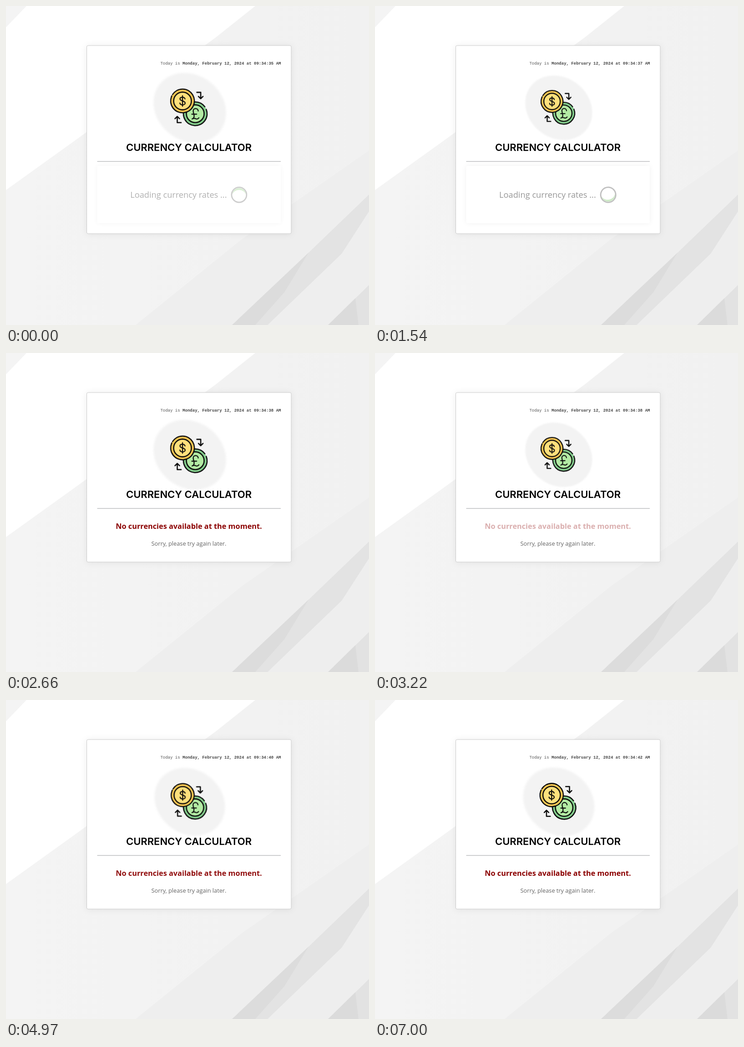
Animation of 798 by 702 pixels, one loop 7.07 s. Source, as an HTML page:

```html
<!DOCTYPE html>
<html lang="en">
<head>
<meta charset="utf-8">
<title>Currency calculator</title>
<style>
  html, body { margin: 0; width: 100%; height: 100%; overflow: hidden; background: #f2f2f2; }
  svg { display: block; width: 798px; height: 702px; }
  text { font-family: "Open Sans", sans-serif; }
  .clock { font: 9.03px "Liberation Mono", "Courier New", monospace; fill: #555; text-anchor: end; }
  .clock tspan { font-weight: 700; fill: #444; }
  .title { font: 600 22px Inter, sans-serif; text-anchor: middle; }
  .heading { font-size: 16.3px; font-weight: 700; fill: #8b0000; text-anchor: middle; }
  .sorry { font-size: 12.75px; fill: #636363; text-anchor: middle; }
  .loading { font-size: 18.4px; fill: #444; }
  #card { fill: #fff; stroke: #cbcbcb; filter: drop-shadow(0 1px 7px rgba(0, 0, 0, .07)); }
  #panel { fill: #fff; filter: drop-shadow(0 0 6px rgba(0, 0, 0, .11)); }
  #icon { transform-origin: 402px 223px; }
  #content { transform-origin: 402px 415px; }
  #spinner { transform-origin: 513.5px 415.5px; }
  .halo { fill: #f3f3f3; filter: blur(2px); }
  .ink { fill: none; stroke: #0b0b0b; stroke-width: 2.6; stroke-linecap: round; stroke-linejoin: round; }
  .ink .sign { stroke-width: 2.3; }
</style>
</head>
<body>
<svg viewBox="0 0 798 702">
  <defs>
    <linearGradient id="paper" x1="0" y1="0" x2="1" y2="0">
      <stop offset="0" stop-color="#f4f4f4"/>
      <stop offset="1" stop-color="#f1f1f1"/>
    </linearGradient>
  </defs>

  <g id="backdrop">
    <rect width="798" height="702" fill="url(#paper)"/>
    <path fill="#fff" d="M45 0H548L460 70L160 290L0 405V47Z"/>
    <path fill="#eee" d="M798 318L520 512L285 702H798Z"/>
    <path fill="#e3e3e3" d="M798 415L665 543L497 702H575L738 545L798 452Z"/>
    <path fill="#dcdcdc" d="M665 543L497 702H548L612 630Z"/>
    <path fill="#e2e2e2" d="M798 614L708 702H798Z"/>
    <path fill="#dbdbdb" d="M768 643L708 702H775Z"/>
  </g>

  <rect id="card" x="177.5" y="87" width="449.5" rx="3"/>
  <text class="clock" x="604.5" y="129">Today is <tspan id="time"></tspan></text>

  <g id="icon">
    <ellipse class="halo" cx="404" cy="224" rx="84" ry="72" transform="rotate(38 404 224)"/>
    <circle cx="416" cy="237" r="26" fill="#86d08f"/>
    <circle cx="416" cy="237" r="19.5" fill="#b3eba4"/>
    <g class="ink">
      <path d="M440.2 227.5A26 26 0 1 1 437 221.7"/>
      <circle cx="416" cy="237" r="19.5"/>
      <path class="sign" d="M422.5 231C422 224 411.500 224 411.500 231C411.500 236 415 241 413 245Q412 248 409 248.500Q414 246 417 248Q421 250 424 246M408.500 238H419"/>
    </g>
    <circle cx="388" cy="209" r="26" fill="#fcc954"/>
    <circle cx="388" cy="209" r="19.500" fill="#ffe07c"/>
    <g class="ink">
      <path d="M366.200 194.800A26 26 0 1 1 363.800 199.500A26 26 0 0 1 364.500 197.800M369.700 190.500L370.500 189.800"/>
      <circle cx="388" cy="209" r="19.500"/>
      <path class="sign" d="M388 197.500V220.500M393.500 204.500C392.500 199.500 382.500 199.500 382.500 204.500C382.500 210 393.800 208 393.800 213.500C393.800 218.800 383 219 382.200 213.500"/>
      <path d="M419.500 190H428V203M423 199L428 204L433 199M385 256.500H376.500V243.500M371.500 248L376.500 243L381.500 248"/>
    </g>
  </g>

  <text class="title" x="402" y="318.500">CURRENCY CALCULATOR</text>

  <g id="loader">
    <rect id="panel" x="200.500" y="352" width="403.500" height="126" rx="3"/>
    <g id="content">
      <text class="loading" x="272" y="422">Loading currency rates ...</text>
      <g id="spinner">
        <path fill="#a4d896" d="M498.500 415.500A15 15 0 0 1 528.500 415.500A15.200 13 0 0 0 498.500 415.500Z"/>
        <circle cx="513.500" cy="415.500" r="16.700" fill="none" stroke="#808080" stroke-width="2.600"/>
      </g>
    </g>
  </g>

  <g id="failure">
    <text class="heading" id="heading" x="402" y="386.500">No currencies available at the moment.</text>
    <text class="sorry" x="402" y="423.500">Sorry, please try again later.</text>
  </g>

  <path d="M200.500 342.200H604" stroke="#c6c7c9" stroke-width="1.800"/>
</svg>

<script>
  const LOOP = 7070, STEP = 70, RATE = 1.05;
  const FAIL_AT = 1750, FIRST_TICK = 210, TICK = 1050;
  const $ = id => document.getElementById(id);

  // A paused animation whose position is set from the clock; lead shifts its phase.
  function track(id, keyframes, duration, lead, easing = 'linear') {
    const frames = keyframes.map(frame => ({ ...frame, easing }));
    const animation = $(id).animate(frames, { duration, iterations: Infinity });
    animation.pause();
    return { animation, lead };
  }

  const there = (a, b) => [a, b, a];
  const scale = s => ({ transform: `scale(${s})` });
  const fade = o => ({ opacity: o });

  const tracks = [
    track('icon', there(scale(1.016), scale(0.916)), 2000, 1733, 'ease-in-out'),
    track('loader', there(fade(0.42), fade(1)), 2000, 0, 'ease'),
    track('content', there(scale(0.99), scale(1)), 2000, 0, 'ease'),
    track('spinner', [{ transform: 'rotate(0deg)' }, { transform: 'rotate(360deg)' }], 1000, 0),
    track('heading', there(fade(0), fade(1)), 2000, 2000 - FAIL_AT / RATE + 2000, 'ease')
  ];

  function draw() {
    const now = Math.floor((performance.now() % LOOP) / STEP) * STEP;
    const failed = now >= FAIL_AT;
    const second = 36 + Math.floor((now - FIRST_TICK) / TICK);

    for (const { animation, lead } of tracks) animation.currentTime = now / RATE + lead;
    $('time').textContent = `Monday, February 12, 2024 at 09:34:${second} AM`;
    $('card').setAttribute('height', failed ? 373 : 414);
    $('loader').style.display = failed ? 'none' : '';
    $('failure').style.display = failed ? '' : 'none';
    requestAnimationFrame(draw);
  }
  draw();
</script>
</body>
</html>
```
